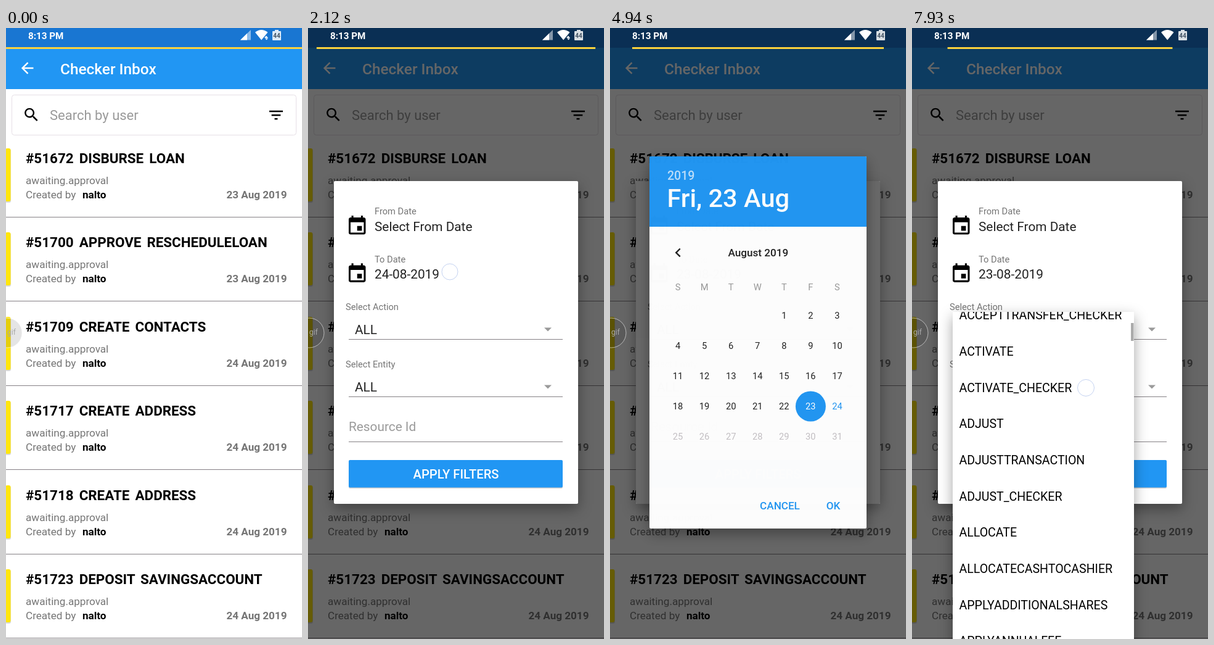
An HTML page for the animation above (8 s loop, 480 px wide and 990 px high).

```html
<!DOCTYPE html>
<html lang="en">
<head>
<meta charset="utf-8">
<title>Checker Inbox</title>
<style>
html, body { margin: 0; width: 100%; height: 100%; overflow: hidden; background: #fff; }
svg { display: block; width: 480px; height: 990px; font-family: Roboto, sans-serif; }
.b { font-weight: 700; }
.m { font-weight: 500; }
.mid { text-anchor: middle; }
.end { text-anchor: end; }
.grey { fill: #757575; }
.hint { fill: #9a9a9a; }
.off { fill: #c4c0c4; }
.ink { fill: #212121; }
.blue { fill: #2196f3; }
.white { fill: #fff; }
.s12 { font-size: 14.67px; }
.s14 { font-size: 17.1px; }
.s16 { font-size: 19.55px; }
.s17 { font-size: 20.8px; }
.s18 { font-size: 22px; }
.title { font-size: 22.4px; word-spacing: 3.5px; }
.rule { stroke: #858085; }
.sheet { filter: drop-shadow(0 8px 11px rgba(0, 0, 0, .36)); }
.dot { fill: #fff; fill-opacity: .35; stroke: #9db4e6; stroke-opacity: .6; }

/* One loop is 8 s, so 1% is 80 ms. */
.anim { animation: 8s linear infinite; }
.step { animation-timing-function: step-end; }
#line { animation-name: line; transform-origin: 240px 0; }
#link { animation-name: link; }
#dim { animation-name: dim; }
#dialog { animation-name: dialog; }
#panel { animation-name: settle; }
.grow { animation-name: grow; }
.early { animation-name: early; }
.late { animation-name: late; }
#shade { animation-name: shade; }
#picker { animation-name: picker; }
#month { animation-name: month; }
.before { animation-name: before; }
.after { animation-name: after; }
.old { animation-name: old; }
.new { animation-name: new; }
#popup { animation-name: popup; }
#items { animation-name: scroll; }
#thumb { animation-name: thumb; }
#ripple { animation-name: ripple; }
#tapDate { animation-name: tapDate; }
#tapDay { animation-name: tapDay; }
#tapAction { animation-name: tapAction; }
#drag { animation-name: drag; }

@keyframes line {
  0% { transform: none; }
  1.8% { transform: scaleX(.99); }
  5.6% { transform: scaleX(.98); }
  8.4% { transform: scaleX(.97); }
  11.7% { transform: scaleX(.958); }
  15.3% { transform: scaleX(.95); }
  22.4% { transform: scaleX(.942); }
  30.6% { transform: scaleX(.93); }
  31.8% { transform: scaleX(.91); }
  35.2% { transform: scaleX(.9); }
  39% { transform: scaleX(.89); }
  44.7% { transform: scaleX(.88); }
  49.4% { transform: scaleX(.88); }
  50.7% { transform: scaleX(.87); }
  54.3% { transform: scaleX(.86); }
  57.7% { transform: scaleX(.85); }
  64.9% { transform: scaleX(.841); }
  69.6% { transform: scaleX(.82); }
  74.4% { transform: scaleX(.81); }
  82% { transform: scaleX(.8); }
  87.4% { transform: scaleX(.79); }
  90.7% { transform: scaleX(.78); }
  96.5% { transform: scaleX(.77); }
  99%, 100% { transform: scaleX(.76); }
}
@keyframes link {
  0%, 42.7%, 73.2% { opacity: 1; }
  30.6%, 59.8%, 94.3%, 100% { opacity: 0; }
}
@keyframes dim { 0%, 5.2% { opacity: 0; } 8.5%, 100% { opacity: .6; } }
@keyframes dialog { 0%, 6% { opacity: 0; } 8.5%, 100% { opacity: 1; } }
@keyframes settle {
  0% { transform: translateY(20px); }
  18.1% { transform: translateY(13px); }
  19.1% { transform: translateY(5px); }
  20.1% { transform: translateY(2px); }
  21.2% { transform: translateY(1px); }
  22.4%, 100% { transform: none; }
}
@keyframes grow { 0% { transform: translateY(var(--d)); } 17.1%, 100% { transform: none; } }
@keyframes early { 0% { opacity: 1; } 17.1%, 100% { opacity: 0; } }
@keyframes late { 0% { opacity: 0; } 17.1%, 100% { opacity: 1; } }
@keyframes shade { 0%, 30.5% { opacity: 0; } 31.8%, 61.7% { opacity: .6; } 65%, 100% { opacity: 0; } }
@keyframes picker { 0%, 30.2% { opacity: 0; } 31.8%, 61.7% { opacity: 1; } 64.9%, 100% { opacity: 0; } }
@keyframes month { 0%, 30.6% { opacity: 0; } 31.8%, 33% { opacity: .5; } 33.1%, 100% { opacity: 1; } }
@keyframes before { 0% { opacity: 1; } 44.7%, 100% { opacity: 0; } }
@keyframes after { 0% { opacity: 0; } 44.7%, 100% { opacity: 1; } }
@keyframes old { 0% { opacity: 1; } 61.7%, 100% { opacity: 0; } }
@keyframes new { 0% { opacity: 0; } 61.7%, 100% { opacity: 1; } }
@keyframes popup { 0%, 88% { opacity: 0; } 90.7%, 100% { opacity: 1; } }
@keyframes scroll { 0%, 94.3% { transform: none; } 99%, 100% { transform: translateY(-141px); } }
@keyframes thumb { 0%, 94.2% { transform: none; opacity: 0; } 94.3% { transform: none; opacity: 1; } 99%, 100% { transform: translateY(18px); opacity: 1; } }
@keyframes ripple { 0%, 78.1% { opacity: 0; } 80.5%, 83% { opacity: .1; } 87.4%, 100% { opacity: 0; } }
@keyframes tapDate { 0%, 28.1%, 100% { opacity: 0; } 24.8% { opacity: 1; } }
@keyframes tapDay { 0%, 50.7%, 100% { opacity: 0; } 42.7% { opacity: 1; } }
@keyframes tapAction { 0%, 84%, 100% { opacity: 0; } 78.1% { opacity: 1; } }
@keyframes drag { 0%, 94.2% { transform: translateY(141px); opacity: 0; } 94.3% { transform: translateY(141px); opacity: 1; } 99%, 100% { transform: none; opacity: 1; } }
</style>
</head>
<body>
<svg viewBox="0 0 480 990">
  <defs>
    <path id="event" d="M17 12h-5v5h5v-5zM16 1v2H8V1H6v2H5c-1.11 0-1.99.9-1.99 2L3 19c0 1.1.89 2 2 2h14c1.1 0 2-.9 2-2V5c0-1.1-.9-2-2-2h-1V1h-2zm3 18H5V8h14v11z"/>
    <path id="arrow" class="hint" d="M383 -3h12l-6 6z"/>
    <clipPath id="popupClip"><path d="M66 460h294v530H66z"/></clipPath>
  </defs>

  <rect width="480" height="990" fill="#fff"/>
  <rect width="480" height="99" class="blue"/>
  <rect width="480" height="32" fill="#1976d2"/>
  <path class="white" transform="translate(20 50.3) scale(1.222)" d="M20 11H7.83l5.59-5.59L12 4l-8 8 8 8 1.41-1.41L7.83 13H20v-2z"/>
  <text x="88" y="74.5" class="m white" font-size="24.4">Checker Inbox</text>
  <rect x="9.5" y="108.5" width="461" height="65" rx="4" fill="#fff" stroke="#e6dfe6"/>
  <path transform="translate(26.5 126) scale(1.222)" d="M15.5 14h-.79l-.28-.27C15.41 12.59 16 11.11 16 9.5 16 5.91 13.09 3 9.5 3S3 5.91 3 9.5 5.91 16 9.5 16c1.61 0 3.09-.59 4.23-1.57l.27.28v.79l5 4.99L20.49 19l-4.99-5zm-6 0C7.01 14 5 11.99 5 9.5S7.01 5 9.5 5 14 7.01 14 9.5 11.99 14 9.5 14z"/>
  <text x="71" y="149" class="hint s18">Search by user</text>
  <path transform="translate(423.3 126.5) scale(1.222)" d="M10 18h4v-2h-4v2zM3 6v2h18V6H3zm3 7h12v-2H6v2z"/>
  <g id="rows"></g>
  <rect id="dim" class="anim" width="480" height="990"/>

  <g id="dialog" class="anim"><g id="panel" class="anim step">
    <g class="sheet white">
      <rect x="42" y="248" width="396" height="483" rx="2"/>
      <rect x="42" y="288" width="396" height="483" rx="2" class="anim step grow" style="--d:-40px"/>
    </g>
    <use href="#event" transform="translate(61.4 302.5) scale(1.528)"/>
    <text x="108" y="302" class="grey s12">From Date</text>
    <text x="108" y="329" class="ink s17">Select From Date</text>
    <use href="#event" transform="translate(61.4 379.8) scale(1.528)"/>
    <text x="108" y="379.5" class="grey s12">To Date</text>
    <text x="108" y="406" class="ink s17 anim step old">24-08-2019</text>
    <text x="108" y="406" class="ink s17 anim step new">23-08-2019</text>
    <g class="anim step early">
      <path class="rule" d="M61 344.5h357"/>
      <path stroke="#d0d0d0" d="M61 421.5h357"/>
    </g>

    <text x="61" y="457" class="grey s12">Select Action</text>
    <text x="76" y="496" class="ink s17 anim step late">ALL</text>
    <circle id="ripple" class="anim" cx="389" cy="489" r="23"/>
    <g class="anim step grow" style="--d:-10px"><use href="#arrow" y="488.5"/></g>
    <g class="anim step grow" style="--d:-20px">
      <path class="rule" d="M66 504.5h347"/>
      <text x="61" y="550" class="grey s12">Select Entity</text>
    </g>
    <text x="76" y="589" class="ink s17 anim step late">ALL</text>
    <g class="anim step grow" style="--d:-30px"><use href="#arrow" y="581.5"/></g>
    <g class="anim step grow" style="--d:-40px">
      <path class="rule" d="M66 597.5h347M66 670.5h347"/>
      <text x="66" y="653" class="hint s17">Resource Id</text>
      <rect x="66" y="701" width="347" height="45" rx="2" opacity=".2"/>
      <rect x="66" y="700" width="347" height="44.5" rx="2" class="blue"/>
      <text x="240" y="730" class="m white mid" font-size="20.2">APPLY FILTERS</text>
    </g>
    <rect id="shade" class="anim" x="42" y="248" width="396" height="523" rx="2"/>
  </g></g>

  <g id="picker" class="anim">
    <rect x="64" y="208" width="352" height="603" rx="2" class="sheet white"/>
    <path class="blue" d="M64 322V210q0-2 2-2h348q2 0 2 2v112z"/>
    <text x="93" y="246" class="m white s16" opacity=".7">2019</text>
    <g class="m white" font-size="41.5">
      <text x="92.5" y="290" class="anim step before">Sat, 24 Aug</text>
      <text x="92.5" y="290" class="anim step after">Fri, 23 Aug</text>
    </g>
    <g id="month" class="anim">
      <path class="ink" transform="translate(95.7 349.3) scale(1.222)" d="M15.41 7.41L14 6l-6 6 6 6 1.41-1.41L10.83 12z"/>
      <text x="240.3" y="370" class="m ink s14 mid">August 2019</text>
      <circle cx="368.5" cy="613" r="24.5" class="blue anim step before"/>
      <circle cx="325.4" cy="613" r="24.5" class="blue anim step after"/>
      <g id="days" class="s12 mid"></g>
    </g>
    <text x="275.5" y="780" class="m blue s14 mid">CANCEL</text>
    <text x="362" y="780" class="m blue s14 mid">OK</text>
  </g>

  <g id="popup" class="anim">
    <rect x="66" y="460" width="294" height="540" class="sheet white"/>
    <g clip-path="url(#popupClip)"><g id="items" class="anim s16"></g></g>
    <rect id="thumb" class="anim" x="355" y="460" width="4.5" height="29" fill="#aaa"/>
  </g>

  <circle class="anim step dot" id="tapDate" cx="230" cy="395" r="13"/>
  <circle class="anim step dot" id="tapDay" cx="323" cy="610" r="13"/>
  <circle class="anim step dot" id="tapAction" cx="300" cy="492" r="13.5"/>
  <circle class="anim dot" id="drag" cx="282" cy="583" r="13.5"/>

  <circle cx="2" cy="494" r="24" fill-opacity=".1" stroke="#fff" stroke-opacity=".55"/>
  <text x="9" y="497" class="mid" font-size="12" fill="#a8a8a8">gif</text>

  <g fill="#fff">
    <text x="36" y="18" class="b" font-size="15.2">8:13 PM</text>
    <path opacity=".5" d="M380 19.5L397 3v16.5z"/>
    <path d="M380 19.5L391 8.8v10.7z"/>
    <path d="M404 7q10-8 20.5 0L414.2 19.5z"/>
    <path opacity=".85" d="M432 6q0-1 1-1h3V3h6v2h3q1 0 1 1v13q0 1-1 1h-12q-1 0-1-1z"/>
    <text x="439" y="15.5" class="b mid" font-size="10" fill="#456">44</text>
    <path id="link" class="anim step" d="M419 16l3-3.500 3 3.500zM420 16.500h5l-2.500 3z"/>
  </g>
  <rect id="line" class="anim step" y="31" width="480" height="3" fill="#fdd23c"/>
</svg>
<script>
const add = (id, html) => document.getElementById(id).innerHTML += html;

const tasks = [
  ["#51672 DISBURSE LOAN", 23], ["#51700 APPROVE RESCHEDULELOAN", 23],
  ["#51709 CREATE CONTACTS", 24], ["#51717 CREATE ADDRESS", 24],
  ["#51718 CREATE ADDRESS", 24], ["#51723 DEPOSIT SAVINGSACCOUNT", 24]
];
tasks.forEach(([title, day], i) => add("rows", `<g transform="translate(0 ${Math.round(i * 136.4)})">
  <rect x="-1" y="196" width="9" height="87" rx="3" opacity=".15"/>
  <rect x="-1" y="195" width="8.5" height="86" rx="3" fill="#ffe60d"/>
  <text x="32" y="219" class="b title">${title}</text>
  <text x="32" y="252.5" class="grey s14">awaiting.approval</text>
  <text x="32" y="276" class="grey s14">Created by</text>
  <text x="124" y="276" class="b s14">nalto</text>
  <text x="455.5" y="276" class="b grey s14 end">${day} Aug 2019</text>
  <path class="rule" d="M0 306.5h480"/></g>`));

const cell = (col, y, text, cls) =>
  add("days", `<text x="${110 + col * 43.07}" y="${y + 5.2}" class="${cls}">${text}</text>`);
[..."SMTWTFS"].forEach((d, i) => cell(i, 420, d, "hint"));
for (let d = 1; d <= 31; d++) {
  const slot = d + 3, col = slot % 7, y = 466 + 49 * Math.floor(slot / 7);
  if (d === 23 || d === 24) {
    cell(col, y, d, "anim step before " + (d === 24 ? "white" : "ink"));
    cell(col, y, d, "anim step after " + (d === 24 ? "blue" : "white"));
  } else cell(col, y, d, d > 24 ? "off" : "ink");
}

const actions = ["ALL", "ACCEPTTRANSFER", "ACCEPTTRANSFER_CHECKER", "ACTIVATE", "ACTIVATE_CHECKER",
  "ADJUST", "ADJUSTTRANSACTION", "ADJUST_CHECKER", "ALLOCATE", "ALLOCATECASHTOCASHIER",
  "APPLYADDITIONALSHARES", "APPLYANNUALFEE"];
actions.forEach((name, i) => add("items", `<text x="76.5" y="${496 + i * 58.65}">${name}</text>`));
</script>
</body>
</html>
```
